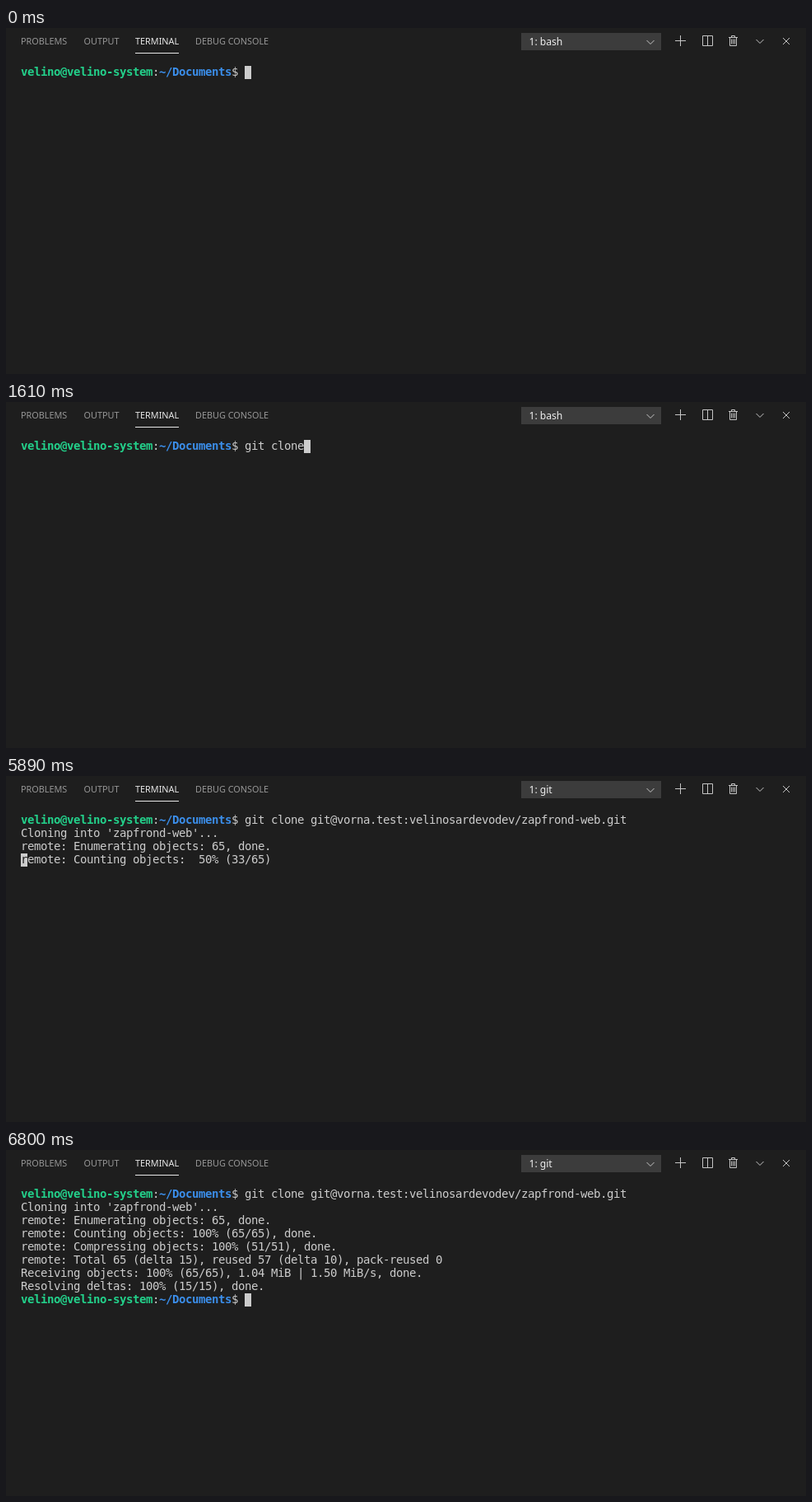
These frames come from a looping animation (972 px wide and 420 px high, 8000 ms). An HTML page:

```html
<!DOCTYPE html>
<html lang="en">
<head>
<meta charset="utf-8">
<title>Terminal</title>
<style>
  html, body { margin: 0; width: 100%; height: 100%; overflow: hidden; background: #1e1e1e; }
  svg { display: block; }
  text { white-space: pre; }
  .ui { font-family: "Noto Sans", "Open Sans", sans-serif; }
  .tab { font-size: 10.85px; fill: #969696; }
  .tab.active { fill: #e7e7e7; }
  .shell { font-size: 12.1px; fill: #f0f0f0; }
  .icons { fill: none; stroke: #c5c5c5; stroke-width: 1; }
  #screen { font: 14px "DejaVu Sans Mono", monospace; }
  #screen .bold { font-weight: bold; }
</style>
</head>
<body>
<svg width="972" height="420" viewBox="0 0 972 420">
  <rect width="972" height="420" fill="#1e1e1e"/>
  <g class="ui">
    <text class="tab" x="18" y="20">PROBLEMS</text>
    <text class="tab" x="94.5" y="20">OUTPUT</text>
    <text class="tab active" x="157" y="20">TERMINAL</text>
    <text class="tab" x="230" y="20">DEBUG CONSOLE</text>
    <rect x="157" y="30" width="53" height="1" fill="#e7e7e7"/>
    <rect x="626" y="6" width="170" height="21" fill="#3c3c3c"/>
    <text class="shell" id="shell" x="635.5" y="21"></text>
  </g>
  <g class="icons">
    <path d="M778.5 15l4.5 4.5 4.5-4.5"/>
    <path d="M813 15.5h13M819.5 9v13"/>
    <path d="M846.5 9.5h12v12h-12zM852.5 9.5v12"/>
    <path d="M878 11.5h11M881.5 11.5v-2h4v2M879.5 11.5v10h8v-10M881.5 13.5v6M883.5 13.5v6M885.5 13.5v6"/>
    <path d="M911.5 14l4.5 4.5 4.5-4.5"/>
    <path d="M944 12l8 8M952 12l-8 8"/>
  </g>
  <g id="screen"></g>
</svg>
<script>
const LOOP = 8000, STEP = 70;
const LEFT = 18, TOP = 46, CELL_W = 8, CELL_H = 16, BASE = 12;
const FG = "#cccccc", BG = "#1e1e1e", GREEN = "#23d18b", BLUE = "#3b8eea";

const USER = "velino@velino-system", FOLDER = "~/Documents", REPO = "zapfrond-web";
const COMMAND = `git clone git@vorna.test:velinosardevodev/${REPO}.git`;
const PROMPT_COLS = USER.length + FOLDER.length + 3;

// [time, characters typed]; the address is pasted in one go
const KEYS = [[70, 1], [280, 2], [420, 3], [630, 4], [770, 5], [980, 6],
              [1120, 7], [1540, 8], [1610, 9], [1750, 10], [1890, COMMAND.length]];
const ENTER = 3890, FETCH = 5890, TOTAL = 6730, DONE = 6800;

const screen = document.getElementById("screen");
const shell = document.getElementById("shell");

function add(name, attrs, content = "") {
  const el = document.createElementNS("http://www.w3.org/2000/svg", name);
  for (const key in attrs) el.setAttribute(key, attrs[key]);
  el.textContent = content;
  screen.appendChild(el);
}

const colX = col => LEFT + col * CELL_W;

// Every character sits in its own terminal cell
function write(row, col, str, fill = FG, bold = false) {
  const x = [...str].map((_, i) => colX(col + i)).join(" ");
  add("text", { x, y: TOP + row * CELL_H + BASE, fill, class: bold ? "bold" : "" }, str);
}

function cursor(row, col, under = "") {
  add("rect", { x: colX(col), y: TOP + row * CELL_H, width: CELL_W, height: CELL_H, fill: FG });
  if (under) write(row, col, under, BG);
}

function prompt(row, typed) {
  write(row, 0, USER, GREEN, true);
  write(row, USER.length, ":");
  write(row, USER.length + 1, FOLDER, BLUE, true);
  write(row, PROMPT_COLS - 2, "$");
  if (typed) write(row, PROMPT_COLS, typed);
}

function progress(label, n, total) {
  const percent = String(Math.floor(n * 100 / total)).padStart(3);
  return `${label}: ${percent}% (${n}/${total})`;
}

const counting = n => progress("remote: Counting objects", n, 65);
const compressing = n => progress("remote: Compressing objects", n, 51);
const receiving = n => progress("Receiving objects", n, 65);
const resolving = n => progress("Resolving deltas", n, 15);

function output(t) {
  const lines = [`Cloning into '${REPO}'...`];
  if (t < FETCH) return lines;
  const k = Math.floor((t - FETCH) / STEP);
  lines.push("remote: Enumerating objects: 65, done.");
  if (k < 1) return [...lines, counting(33)];
  lines.push(counting(65) + ", done.");
  if (k < 3) return [...lines, compressing(k * 17)];
  lines.push(compressing(51) + ", done.");
  if (t < TOTAL) return [...lines, receiving(26 + 6 * (k - 5))];
  lines.push("remote: Total 65 (delta 15), reused 57 (delta 10), pack-reused 0",
             receiving(65) + ", 1.04 MiB | 1.50 MiB/s, done.");
  lines.push(t < DONE ? resolving(0) : resolving(15) + ", done.");
  return lines;
}

function draw(t) {
  screen.textContent = "";
  shell.textContent = t < FETCH ? "1: bash" : "1: git";
  const typed = KEYS.reduce((n, [time, count]) => t >= time ? count : n, 0);
  prompt(0, COMMAND.slice(0, typed));
  if (t < ENTER) return cursor(0, PROMPT_COLS + typed);

  const lines = output(t);
  lines.forEach((line, i) => write(i + 1, 0, line));
  const last = lines.length;
  if (t < FETCH) {
    cursor(last + 1, 0);
  } else if (t < DONE) {
    cursor(last, 0, lines[last - 1][0]);
  } else {
    prompt(last + 1);
    cursor(last + 1, PROMPT_COLS);
  }
}

function tick() {
  draw(performance.now() % LOOP);
  requestAnimationFrame(tick);
}
tick();
</script>
</body>
</html>
```
